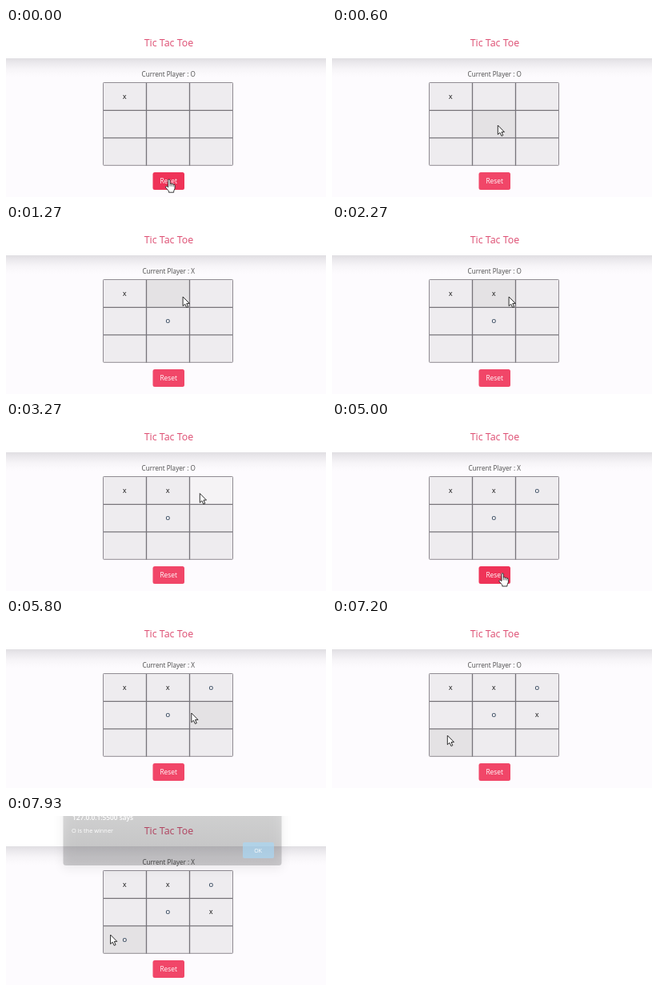
An HTML page for the animation above (8 s loop, 400x212 px).

```html
<!DOCTYPE html>
<html lang="en">
<head>
<meta charset="utf-8">
<title>Tic Tac Toe</title>
<style>
  html, body { margin: 0; width: 100%; height: 100%; overflow: hidden; background: #fdfbfe; }
  svg { display: block; width: 400px; height: 212px; }
  text { font-family: "Open Sans", "Noto Sans", sans-serif; fill: #4a4a4a; }
  .mid { text-anchor: middle; }
  .mark { font-size: 7.2px; font-weight: 600; }
</style>
</head>
<body>
<svg viewBox="0 0 400 212">
  <defs>
    <linearGradient id="shade" x2="0" y2="1">
      <stop offset="0" stop-color="#e0dee2"/>
      <stop offset=".25" stop-color="#ebe9ed"/>
      <stop offset=".6" stop-color="#f7f5f8"/>
      <stop offset="1" stop-color="#fdfbfe"/>
    </linearGradient>
    <linearGradient id="glass" x2="0" y2="1">
      <stop offset=".25" stop-color="#292a2d" stop-opacity=".15"/>
      <stop offset="1" stop-color="#292a2d" stop-opacity=".22"/>
    </linearGradient>
    <filter id="blur" x="-20%" y="-50%" width="140%" height="200%">
      <feGaussianBlur stdDeviation="7"/>
    </filter>
  </defs>
  <rect width="400" height="212" fill="#fdfbfe"/>
  <rect y="38" width="400" height="23" fill="url(#shade)"/>
  <rect width="400" height="38" fill="#fff"/>
  <text class="mid" x="203.4" y="22.6" font-size="12.4" style="fill:#dd4a6f">Tic Tac Toe</text>
  <text class="mid" id="status" x="203.2" y="60.8" font-size="8.15"></text>
  <g id="board"></g>
  <rect id="reset" x="183.5" y="181" width="39.5" height="22" rx="2.5"/>
  <text class="mid" x="203.2" y="195.2" font-size="8.4" style="fill:#fff">Reset</text>

  <g id="arrow" stroke="#222" stroke-linejoin="round">
    <path d="M.3 0V11.6L2.9 9.2 4.9 13.4 6.8 12.6 5 8.4H8.5Z" fill="#fff" stroke-width=".95"/>
  </g>
  <g id="hand" stroke="#222" stroke-linejoin="round">
    <path d="M-1 8V1Q-1-.3.1-.3T1.3 1V5Q2.7 4.3 3.4 5.4 4.8 4.8 5.5 6 7.4 5.6 7.4 7.4V11L6 14.5V16H-.2V14.5L-4 10Q-4.5 8.7-3.4 8.3-2.3 8.1-1 9.6Z" fill="#fff" stroke-width=".9"/>
    <path d="M1.3 5V8.4M3.4 5.6V8.5M5.5 6.2V8.7" fill="none" stroke-width=".7"/>
  </g>

  <g id="dialog">
    <rect x="71" y="-20" width="274" height="86" rx="4" fill="#000" opacity=".07" filter="url(#blur)"/>
    <rect x="71.5" y="-20" width="273" height="82" rx="3.5" fill="url(#glass)"/>
    <rect x="296" y="33" width="39" height="20" rx="2" fill="#a9d8f5" opacity=".7"/>
    <text x="83" y="5" font-size="8.3" font-weight="600" style="fill:#fff">127.0.0.1:5500 says</text>
    <text x="82" y="21" font-size="7.4" style="fill:#fff">O is the winner</text>
    <text class="mid" x="315" y="45.8" font-size="7" style="fill:#fff">OK</text>
  </g>
</svg>
<script>
const LOOP = 8000, PRESS = 110;
const xs = [121.5, 175.5, 229.5, 283.5];
const ys = [68.5, 103.3, 137.8, 172.3];

// time, x, y of the pointer tip
const path = [
  [0, 203.7, 190.2], [70, 203.7, 189], [560, 207, 122], [900, 207, 122],
  [1250, 220.8, 90], [2330, 220.8, 90], [2850, 242, 89.6], [3480, 242, 89.6],
  [4100, 208.8, 157], [4450, 208.8, 157], [4900, 213, 190], [5330, 213, 190],
  [5780, 231.5, 118], [6850, 231.5, 118], [7180, 144, 146], [7480, 144, 146],
  [7700, 130.3, 149], [LOOP, 130.3, 149]
];
// time, cell index, mark
const moves = [
  [-1000, 0, "X"], [800, 4, "O"], [2200, 1, "X"],
  [3330, 2, "O"], [6400, 5, "X"], [7790, 6, "O"]
];
// time, opacity, vertical offset
const dialogSteps = [[0, 0, 0], [7865, .45, -3], [7925, 1, 0]];

const $ = id => document.getElementById(id);
const add = (tag, attrs) => {
  const el = document.createElementNS("http://www.w3.org/2000/svg", tag);
  for (const key in attrs) el.setAttribute(key, attrs[key]);
  return $("board").appendChild(el);
};

const cells = Array.from({ length: 9 }, (_, i) => {
  const x = xs[i % 3], y = ys[i / 3 | 0];
  const w = xs[i % 3 + 1] - x, h = ys[(i / 3 | 0) + 1] - y;
  return {
    x, y, w, h,
    box: add("rect", { x, y, width: w, height: h }),
    label: add("text", { class: "mid mark", x: x + w / 2 - .2, y: y + h / 2 + 2.7 })
  };
});
add("path", {
  d: `M${xs[1]} 68V173M${xs[2]} 68V173M121 ${ys[1]}H284M121 ${ys[2]}H284`,
  stroke: "#77747a", "stroke-width": 1.3
});
add("rect", {
  x: xs[0], y: ys[0], width: xs[3] - xs[0], height: ys[3] - ys[0],
  rx: .8, fill: "none", stroke: "#8f8b92"
});

function pointerAt(t) {
  const i = Math.max(1, path.findIndex(p => p[0] >= t));
  const [t0, x0, y0] = path[i - 1], [t1, x1, y1] = path[i];
  const u = (t - t0) / (t1 - t0), e = u * u * (3 - 2 * u);
  return [x0 + (x1 - x0) * e, y0 + (y1 - y0) * e];
}

function draw(t) {
  const [x, y] = pointerAt(t);
  const played = moves.filter(m => m[0] <= t);
  $("status").textContent = "Current Player : " + (played.length % 2 ? "O" : "X");

  cells.forEach((c, i) => {
    const hover = x > c.x && x < c.x + c.w && y > c.y && y < c.y + c.h;
    const pressed = moves.some(m => m[1] === i && t < m[0] && t >= m[0] - PRESS);
    const move = played.find(m => m[1] === i);
    c.box.setAttribute("fill", pressed ? "#f5f3f5" : hover ? "#e4e2e4" : "#eeecef");
    c.label.textContent = move ? move[2] : "";
    c.label.style.fill = move && move[2] === "O" ? "#30445a" : "#2a2a2a";
  });

  const onReset = x > 183.5 && x < 223 && y > 181 && y < 203;
  $("reset").setAttribute("fill", onReset ? "#ef3358" : "#f14668");
  for (const [id, shown] of [["hand", onReset], ["arrow", !onReset]]) {
    $(id).setAttribute("transform", `translate(${x} ${y})`);
    $(id).style.display = shown ? "" : "none";
  }

  const [, opacity, dy] = dialogSteps.filter(s => s[0] <= t).pop();
  $("dialog").setAttribute("opacity", opacity);
  $("dialog").setAttribute("transform", `translate(0 ${dy})`);
}

const start = performance.now();
function tick() {
  draw((performance.now() - start) % LOOP);
  requestAnimationFrame(tick);
}
tick();
</script>
</body>
</html>
```
